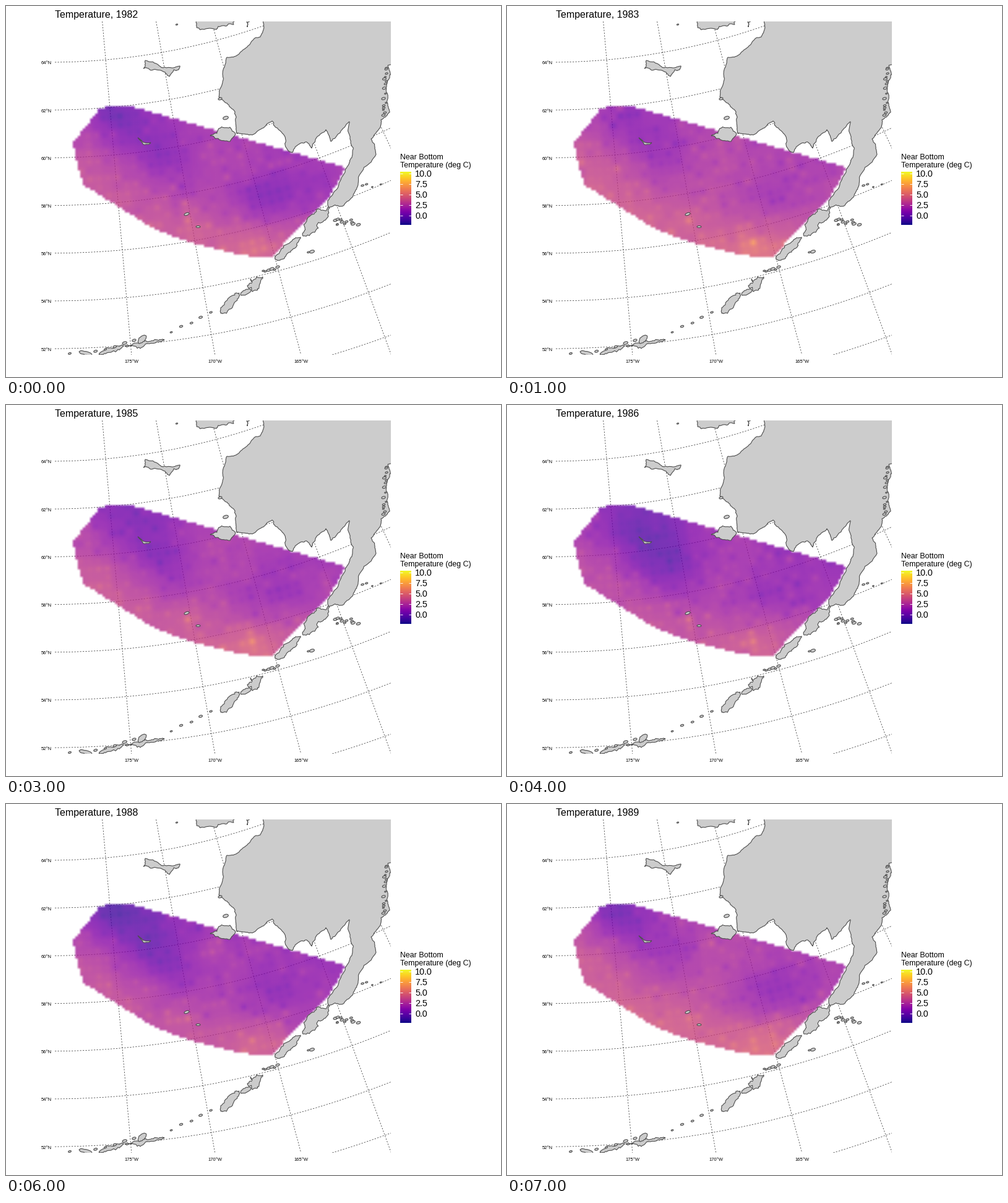
Write a matplotlib script that moves like this. It is 800 px wide and 600 px high and loops after 8000 ms.

```python
import numpy as np
import matplotlib.pyplot as plt
from matplotlib.animation import FuncAnimation
from matplotlib.patches import Polygon, Rectangle
from matplotlib.path import Path

W, H, DPI = 800, 600, 100
PX = 72 / DPI  # points per pixel
POLE = np.array([70, -954])
T_MIN, T_MAX = -2.2, 10.45
ALPHA = 0.8
CELL = 4
X0, X1, Y0, Y1 = 100, 556, 154, 414
FIRST_YEAR = 1982

plt.rcParams["font.family"] = "Liberation Sans"
fig = plt.figure(figsize=(W / DPI, H / DPI), dpi=DPI, facecolor="white")
ax = fig.add_axes([0, 0, 1, 1])
panel = Rectangle((79, 25), 543, 539, transform=ax.transData)
cmap = plt.get_cmap("plasma")
rng = np.random.default_rng(4)


def label(x, y, s, size, ha="left"):
    return ax.text(x, y, s, fontsize=size * PX, ha=ha, va="baseline", color="black")


def polar(radius, angle):
    return POLE[0] + radius * np.sin(angle), POLE[1] + radius * np.cos(angle)


def grid_line(x, y):
    line, = ax.plot(x, y, color="#333333", lw=0.75 * PX, dashes=(3, 3),
                    dash_capstyle="butt", zorder=1)
    line.set_clip_path(panel)


def fractal(pts, amp):
    """Turn a closed outline into a coast by shifting midpoints sideways."""
    while np.hypot(*(np.roll(pts, -1, 0) - pts).T).mean() > 2.5:
        side = np.roll(pts, -1, 0) - pts
        normal = np.column_stack([-side[:, 1], side[:, 0]])
        mid = pts + side / 2 + normal * rng.normal(0, amp, (len(pts), 1))
        pts = np.stack([pts, mid], axis=1).reshape(-1, 2)
    return pts


def land(pts, amp=0.1):
    shape = Polygon(fractal(np.array(pts, float), amp), closed=True, facecolor="#cccccc",
                    edgecolor="#4d4d4d", lw=1.1 * PX, zorder=3)
    ax.add_patch(shape)
    shape.set_clip_path(panel)


def ridge(x0, y0, x1, y1, width, amp=0.13):
    """A long island between two points."""
    t = np.linspace(0, 2 * np.pi, 12, endpoint=False)
    dx, dy = (x1 - x0) / 2, (y1 - y0) / 2
    half = width / 2 / np.hypot(dx, dy)
    along, across = np.cos(t), np.sin(t) * half
    land(np.column_stack([(x0 + x1) / 2 + dx * along - dy * across,
                          (y0 + y1) / 2 + dy * along + dx * across]), amp)


def islets(x0, y0, x1, y1, count, spread, size):
    """Small islands strewn along a line."""
    for t in np.linspace(0, 1, count):
        x, y = np.array([x0 + (x1 - x0) * t, y0 + (y1 - y0) * t]) + rng.normal(0, spread, 2)
        r = size * rng.uniform(0.6, 1.3)
        ridge(x - r, y + r * 0.3, x + r, y - r * 0.3, r * 1.2)


# Graticule: meridians meet at the pole, parallels are circles around it
for lat in range(50, 67, 2):
    radius = 1045 + (64 - lat) * 38.6
    grid_line(*polar(radius, np.radians(np.linspace(0, 32, 200))))
    if 52 <= lat <= 64:
        label(74, POLE[1] + radius + 3.5, f"{lat}°N", 7.6, "right")
for lon in range(175, 150, -5):
    slope = np.tan(np.radians(180 - lon))
    ys = np.array([25, 564])
    grid_line(POLE[0] + (ys - POLE[1]) * slope, ys)
    if lon >= 165:
        label(POLE[0] + 1519 * slope, 577, f"{lon}°W", 7.6, "center")

# Mainland, from the north along the coast and back outside the panel
land([(413, 10), (416, 38), (411, 50), (390, 66), (376, 78), (357, 83), (350, 110),
      (344, 147), (360, 160), (372, 180), (372, 205), (386, 207), (401, 207), (430, 186),
      (448, 207), (452, 228), (463, 237), (476, 222), (486, 220), (494, 230), (500, 216),
      (517, 200), (525, 219), (540, 205), (555, 187), (556, 215), (559, 245), (546, 272),
      (520, 315), (521, 326), (543, 324), (560, 309), (569, 288), (598, 240), (590, 215),
      (605, 196), (606, 184), (620, 172), (617, 150), (615, 128), (620, 112), (617, 96),
      (640, 86), (640, 10)], 0.07)
land([(305, 10), (308, 35), (320, 38), (340, 38), (343, 33), (368, 30), (371, 10)])
land([(377, 10), (390, 34), (398, 10)])
islets(276, 30, 279, 30, 1, 0, 2)

# Islands within the survey sea
land([(222, 101), (225, 88), (248, 97), (256, 99), (281, 97), (279, 103), (271, 103),
      (264, 114), (257, 107), (238, 103)])
land([(330, 210), (341, 206), (344, 198), (362, 196), (371, 207), (362, 219), (347, 217)])
land([(213, 213), (221, 220), (234, 221), (230, 224), (222, 224)], 0.04)
ridge(288, 338, 296, 335, 4)
ridge(307, 357, 314, 357, 3)
islets(346, 150, 355, 181, 2, 0, 3.5)

# Peninsula, island chain and the small groups around them
land([(522, 325), (521, 340), (505, 350), (499, 366), (480, 372), (483, 358), (488, 342),
      (505, 328)], 0.14)
land([(435, 410), (446, 392), (462, 380), (476, 374), (470, 388), (450, 408)])
land([(390, 452), (395, 441), (415, 438), (409, 455), (398, 462)], 0.2)
ridge(347, 497, 377, 464, 13, 0.17)
ridge(379, 467, 396, 459, 7)
ridge(192, 550, 256, 540, 6)
ridge(214, 545, 226, 533, 9)
ridge(150, 563, 190, 549, 7, 0.18)
ridge(118, 559, 139, 564, 6)
islets(416, 431, 438, 423, 6, 1.2, 3)
islets(267, 529, 332, 496, 5, 1, 3)
islets(103, 562, 104, 562, 1, 0, 2)
islets(145, 560, 206, 541, 5, 1.5, 3)
islets(488, 398, 495, 397, 2, 0.5, 3)
islets(528, 348, 563, 352, 12, 3.5, 3)
islets(574, 288, 604, 290, 4, 2, 2)
islets(614, 98, 608, 178, 16, 2.5, 2.5)

# Survey area and its stations, laid out along the graticule
area = Path([(108, 221), (150, 168), (168, 162), (201, 162), (549, 261), (524, 307),
             (468, 363), (430, 407), (380, 403), (300, 383), (240, 361), (125, 289),
             (118, 266), (112, 240)])
rad, ang = np.meshgrid(np.arange(1110, 1420, 14), np.arange(0.03, 0.5, 0.0117))
stations = np.column_stack([v.ravel() for v in polar(rad, ang)])
stations = stations[area.contains_points(stations)]

gx, gy = np.meshgrid(np.arange(X0, X1, CELL) + CELL / 2, np.arange(Y0, Y1, CELL) + CELL / 2)
cells = np.column_stack([gx.ravel(), gy.ravel()])
inside = area.contains_points(cells).reshape(gx.shape)

# Inverse distance weights from stations to cells
gap = np.hypot(*(cells[:, None] - stations[None]).transpose(2, 0, 1))
weights = (gap + 1) ** -2.5
weights /= weights.sum(axis=1, keepdims=True)

# Per year: mean, then cooling of the northern pool, inner shelf and NW corner
climate = [(2.7, 1.9, 2.5, 1.8), (3.1, 1.8, 1.4, 1.0), (2.8, 3.8, 2.3, 1.2),
           (2.8, 2.5, 1.6, 1.0), (2.4, 3.2, 1.3, 0.6), (3.6, 2.6, 0.7, 2.0),
           (2.4, 2.4, 1.4, 2.4), (3.2, 1.9, 2.5, 2.3)]
warm_spots = [(337, 230), (293, 345), (393, 380)]


def bump(pts, x, y, rx, ry, tilt=0):
    """Gaussian hill with its long axis turned by tilt degrees."""
    dx, dy = (pts - (x, y)).T
    c, s = np.cos(np.radians(tilt)), np.sin(np.radians(tilt))
    return np.exp(-(((dx * c + dy * s) / rx) ** 2 + ((dy * c - dx * s) / ry) ** 2) / 2)


def temperature_image(year):
    mean, north, inner, corner = climate[year]
    noise = np.random.default_rng(FIRST_YEAR + year)
    offshore = (stations - (330, 285)) @ (-0.36, 0.93) / 90
    values = (mean + offshore
              - north * bump(stations, 240, 235, 62, 36, 45)
              - inner * bump(stations, 425, 308, 50, 28, -12)
              - corner * bump(stations, 172, 172, 32, 30)
              + bump(stations, 412, 390, 40, 28)
              + noise.normal(0, 0.35, len(stations)))
    for x, y in warm_spots:
        values += noise.uniform(0.5, 2.5) * bump(stations, x, y, 7, 7)
    field = (weights @ values).reshape(gx.shape)
    rgba = cmap((field - T_MIN) / (T_MAX - T_MIN))
    rgba[..., 3] = ALPHA * inside
    return rgba


images = [temperature_image(year) for year in range(len(climate))]
raster = ax.imshow(images[0], extent=(X0, X1, Y1, Y0), interpolation="bilinear",
                   aspect="auto", zorder=2)

# Legend
label(637, 248, "Near Bottom", 12.4)
label(637, 261, "Temperature (deg C)", 12.4)
ax.imshow(np.linspace(1, 0, 256)[:, None], cmap=cmap, extent=(637, 655, 354, 268),
          aspect="auto", zorder=2)
for i in range(5):
    y = 271 + 17 * i
    label(661, y + 5, f"{10 - 2.5 * i:.1f}", 14.4)
    for x in (637, 651.4):
        ax.plot([x, x + 3.6], [y, y], color="white", lw=0.9 * PX, zorder=3,
                solid_capstyle="butt")

title = label(79, 19, "", 16)
ax.set_xlim(0, W)
ax.set_ylim(H, 0)
ax.axis("off")


def update(year):
    raster.set_data(images[year])
    title.set_text(f"Temperature, {FIRST_YEAR + year}")
    return raster, title


anim = FuncAnimation(fig, update, frames=len(images), interval=1000, repeat=True,
                     repeat_delay=0)
plt.show()
```
